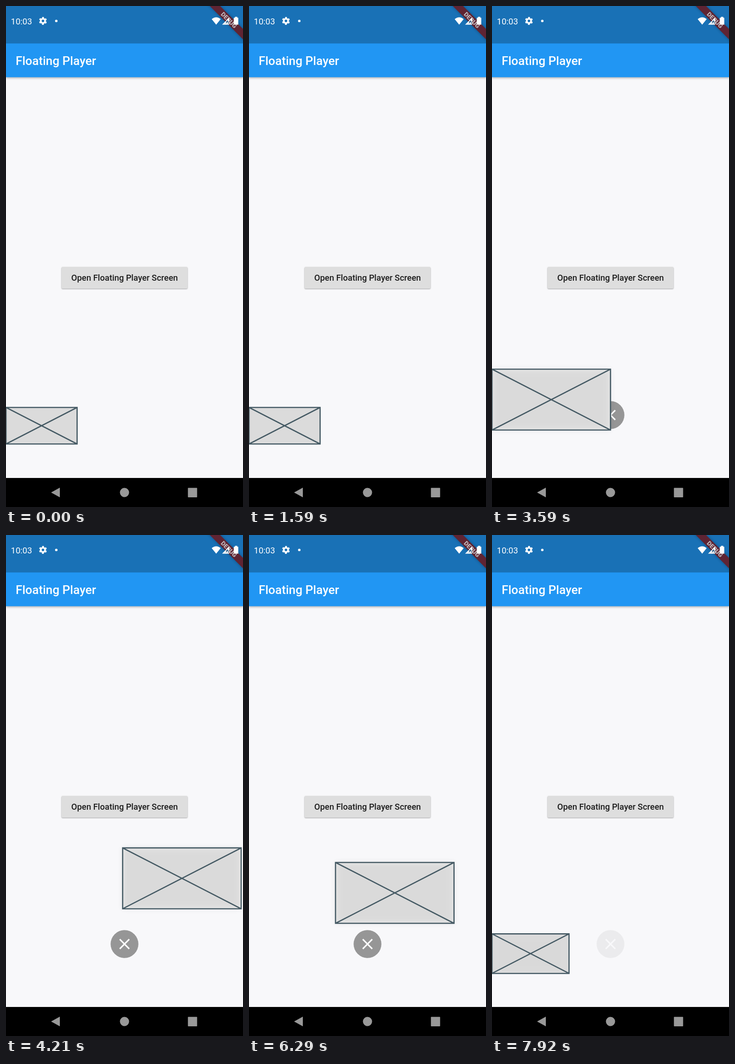
Write an HTML page that moves like this. It is 515 by 1087 pixels and loops after 8000 ms.

```html
<!DOCTYPE html>
<html lang="en">
<head>
<meta charset="utf-8">
<title>Floating Player</title>
<style>
  html, body { margin: 0; width: 100%; height: 100%; overflow: hidden; background: #f8f8fa; }
  svg { display: block; width: 100%; height: 100%; font-family: Roboto, sans-serif; }
  .bar-shadow { filter: drop-shadow(0 2px 2px rgba(0, 0, 0, .28)); }
  .button { fill: #dedede; filter: drop-shadow(0 1.5px 1.3px rgba(0, 0, 0, .36)); }
  .medium { font-weight: 500; }
  #shade { filter: blur(7px); }
</style>
</head>
<body>
<svg viewBox="0 0 515 1087">
  <rect width="515" height="1087" fill="#f8f8fa"/>

  <rect class="button" x="120.8" y="566" width="273.5" height="47" rx="2.6"/>
  <text class="medium" x="141.8" y="596" font-size="18.36" fill="#1c1c1c">Open Floating Player Screen</text>

  <g class="bar-shadow">
    <rect width="515" height="154.5" fill="#2196f3"/>
  </g>
  <rect width="515" height="81.3" fill="#1971b6"/>
  <text class="medium" x="21" y="128.3" font-size="26.2" fill="#fff">Floating Player</text>

  <!-- debug ribbon -->
  <g transform="translate(484.5 30.5) rotate(45)">
    <rect x="-70" y="-7.9" width="140" height="15.8" fill="#000" opacity=".3" style="filter:blur(3px)"/>
    <rect x="-70" y="-7.9" width="140" height="15.8" fill="#5f2433"/>
    <text y="4.8" font-size="13.4" font-weight="900" text-anchor="middle" fill="#c0b6ba">DEBUG</text>
  </g>

  <!-- status icons -->
  <g fill="#fff">
    <text x="10.5" y="39.6" font-size="18.5">10:03</text>
    <g transform="translate(80.3 32.3) rotate(-90)" fill="none" stroke="#fff">
      <circle r="4.7" stroke-width="3.6"/>
      <circle r="7.2" stroke-width="2.8" stroke-dasharray="4 3.54" stroke-dashoffset="2"/>
    </g>
    <circle cx="109.3" cy="32.4" r="2.7"/>
    <path d="M447 28.5Q456.7 20.5 466.5 28.5L456.7 40.5Z"/>
    <path d="M469.5 40.5L485 25V40.5Z"/>
    <path d="M478 38L482 31M478 34H483V39" fill="none" stroke="#1d4f7c" stroke-width="1.4"/>
    <path d="M497.5 23.5h5v2h2.2v15h-9.8v-15h2.6z"/>
  </g>

  <g id="close">
    <circle cx="257.5" cy="887.5" r="30.2" fill="#969696"/>
    <path d="M247.2 877.2l20.6 20.6m0-20.6l-20.6 20.6" stroke="#fff" stroke-width="3.2"/>
  </g>

  <g id="player">
    <rect id="fill"/>
    <rect id="shade"/>
    <path id="cross" fill="none" stroke="#455a64" stroke-width="2.62"/>
  </g>

  <!-- navigation bar -->
  <rect y="1024" width="515" height="63" fill="#000"/>
  <g fill="#999">
    <path d="M98 1055.5L117 1045V1066Z"/>
    <circle cx="257.5" cy="1055.5" r="10"/>
    <rect x="395.3" y="1045.5" width="20" height="20.5" rx="1"/>
  </g>
</svg>

<script>
const LOOP = 8000, LAST = 7920;
const WIDTH = 515, RATIO = 1.95;
const PRESS = 2880, RELEASE = 7640, FADE = 320;

// time, left, top of the player
const PATH = [
  [2880, 0, 871], [3200, 0, 822], [3700, 12, 775], [4210, 253.5, 679],
  [4800, 165, 670], [5350, 70, 695], [5800, 125, 716], [6290, 188, 710.5],
  [6800, 105, 680], [7210, 35, 657.5], [7600, 0, 824], [7640, 0, 826], [7960, 0, 871]
];

const $ = id => document.getElementById(id);
const clamp = (v, lo, hi) => Math.min(hi, Math.max(lo, v));
const mix = (a, b, k) => a + (b - a) * k;

function setAttrs(el, attrs) {
  for (const name in attrs) el.setAttribute(name, attrs[name]);
}

// Smooth curve through the path points
function along(t, axis) {
  const end = PATH.length - 1;
  if (t <= PATH[0][0]) return PATH[0][axis];
  if (t >= PATH[end][0]) return PATH[end][axis];
  const i = PATH.findIndex(p => p[0] > t) - 1;
  const a = PATH[i], b = PATH[i + 1], span = b[0] - a[0];
  const k = (t - a[0]) / span;
  if (t < PRESS + FADE || t >= RELEASE) return mix(a[axis], b[axis], k);
  const slope = j => {
    const p = PATH[j - 1], n = PATH[j + 1], c = PATH[j];
    if ((c[axis] - p[axis]) * (n[axis] - c[axis]) <= 0) return 0;
    return (n[axis] - p[axis]) / (n[0] - p[0]);
  };
  const k2 = k * k, k3 = k2 * k;
  return (2 * k3 - 3 * k2 + 1) * a[axis] + (k3 - 2 * k2 + k) * span * slope(i)
       + (3 * k2 - 2 * k3) * b[axis] + (k3 - k2) * span * slope(i + 1);
}

function draw(t) {
  const held = clamp(Math.min((t - PRESS) / FADE, (RELEASE + FADE - t) / FADE), 0, 1);
  const width = WIDTH * mix(.3, .5, held), height = width / RATIO;
  const x = clamp(along(t, 1), 0, WIDTH - width), y = along(t, 2);
  const grey = Math.round(mix(219, 238, held));

  $('player').setAttribute('transform', `translate(${x} ${y})`);
  setAttrs($('fill'), { width, height, fill: `rgb(${grey},${grey},${grey})` });
  setAttrs($('shade'), { width, height, opacity: .08 * held });
  $('cross').setAttribute('d',
    `M0 0H${width}V${height}H0ZL${width} ${height}M${width} 0L0 ${height}`);
  $('close').setAttribute('opacity', held);
}

const start = performance.now();
function tick() {
  draw(Math.min((performance.now() - start) % LOOP, LAST));
  requestAnimationFrame(tick);
}
tick();
</script>
</body>
</html>
```
